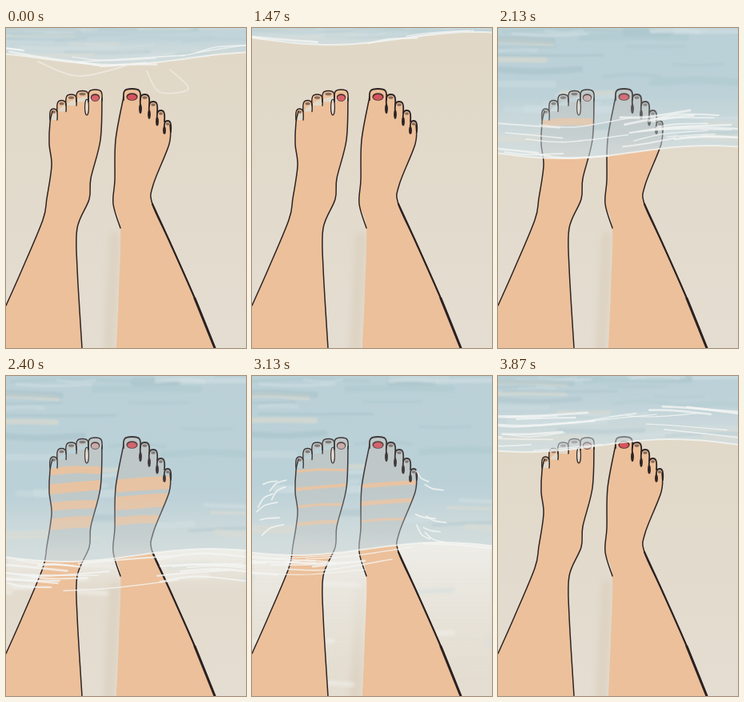
These frames come from a looping animation (300 px wide and 400 px high, 3940 ms). An HTML page with a canvas:

```html
<!DOCTYPE html>
<html lang="en">
<head>
<meta charset="utf-8">
<title>Feet in the surf</title>
<style>
html, body { margin: 0; width: 100%; height: 100%; overflow: hidden; background: #e3dbcd; }
canvas { display: block; width: 300px; height: 400px; }
</style>
</head>
<body>
<canvas id="stage" width="300" height="400"></canvas>
<script>
const ctx = document.getElementById('stage').getContext('2d');
const W = 300, H = 400, LOOP = 3940, LAST = 58;
const SKIN = '#ecc09a', INK = '#2b2223', FOAM = '#f4f6f4';

// Step and mean height of the shoreline
const tide = [[0, 38], [7, -20], [20, -20], [22, 13], [32, 155], [36, 224], [41, 250], [47, 216], [58, 87]];

const lerp = (a, b, k) => a + (b - a) * k;
const clamp = (v, lo = 0, hi = 1) => Math.min(hi, Math.max(lo, v));
const ramp = (v, a, b) => clamp((v - a) / (b - a));

function random(seed) {
  return (lo = 0, hi = 1) => lerp(lo, hi, (seed = seed * 16807 % 2147483647) / 2147483647);
}

function sea(step) {
  const i = Math.max(1, tide.findIndex(key => key[0] >= step));
  const [a, from] = tide[i - 1], [b, to] = tide[i];
  const level = lerp(from, to, ramp(step, a, b));
  const ebb = ramp(step, 36, 47);
  const soak = ramp(step, 32, 36) * (1 - ramp(step, 47, 56));
  return {
    step, level, soak,
    depth: 45 + 125 * ebb,
    band: 15 - 10 * ebb,
    above: clamp((level - 20) * 0.65, 0, 45) * (1 - soak),
    below: (38 - 14 * ebb) * soak,
    at: x => level + 8 * Math.sin((x - 45) / 58 + step * 0.03)
  };
}

// Smooth path passing through a flat list of points
function curve(p, path = new Path2D()) {
  const pt = i => { i = 2 * clamp(i, 0, p.length / 2 - 1); return [p[i], p[i + 1]]; };
  path.lineTo(...pt(0));
  for (let i = 1; i < p.length / 2; i++) {
    const [a, b, c, d] = [pt(i - 2), pt(i - 1), pt(i), pt(i + 1)];
    path.bezierCurveTo(b[0] + (c[0] - a[0]) / 6, b[1] + (c[1] - a[1]) / 6,
      c[0] - (d[0] - b[0]) / 6, c[1] - (d[1] - b[1]) / 6, ...c);
  }
  return path;
}

const flip = p => p.map((_, i) => p[p.length - 2 - i + 2 * (i % 2)]);

const leftOuter = [58, 104, 55, 118, 54, 145, 57, 172, 51, 213, 46, 240, 20, 302, 0, 347];
const leftInner = [120, 88, 118, 140, 106, 188, 104, 214, 89, 250, 89, 300, 95, 400];
const rightInner = [147, 86, 137, 140, 136, 190, 134, 220, 143, 250];
const rightOuter = [205, 121, 204, 145, 184, 196, 183, 220, 205, 268, 236, 338, 261, 400];

// Toes run outwards from the big one
const left = [], right = [];
for (let i = 0, xl = 120, xr = 147; i < 5; i++) {
  const wl = 17 - 2 * i, wr = i ? 12 - i : 21;
  left.push({ x: xl - wl, w: wl, top: 77 + 1.5 * i * i, gap: xl - wl });
  right.push({ x: xr, w: wr, top: 76 + 6 * i + i * i, gap: xr + wr });
  xl -= wl;
  xr += wr;
}
const toes = [...left, ...right];

function toePath({ x, w, top }) {
  const p = new Path2D(), base = top + 14;
  p.moveTo(x, base);
  p.bezierCurveTo(x - 1, top + 2, x + 1, top, x + w / 2, top);
  p.bezierCurveTo(x + w - 1, top, x + w + 1, top + 2, x + w, base);
  return p;
}

function legPath(outline, row) {
  const p = curve(outline);
  row.forEach(t => p.lineTo(t.x + t.w / 2, t.top + 8));
  return p;
}

const leftLeg = legPath([...flip(leftInner)], left);
curve(leftOuter, leftLeg).lineTo(0, 400);
const rightLeg = legPath([138, 400, 141, 330, ...flip(rightInner)], right);
curve(rightOuter, rightLeg);
const skin = new Path2D();
[leftLeg, rightLeg, ...toes.map(toePath)].forEach(p => skin.addPath(p));

function line(path, color, width) {
  ctx.strokeStyle = color;
  ctx.lineWidth = width;
  ctx.stroke(path);
}

function oval(x, y, rx, ry, color) {
  ctx.fillStyle = color;
  ctx.beginPath();
  ctx.ellipse(x, y, rx, ry, 0, 0, 7);
  ctx.fill();
}

function wash(y1, y2, from, to) {
  const g = ctx.createLinearGradient(0, y1, 0, y2);
  g.addColorStop(0, from);
  g.addColorStop(1, to);
  ctx.fillStyle = g;
  ctx.fillRect(0, 0, W, H);
}

// Draw with a temporary clip, opacity or blur
function scoped(draw, { clip, alpha = 1, blur = 0 }) {
  ctx.save();
  if (clip) ctx.clip(clip);
  ctx.globalAlpha *= alpha;
  if (blur) ctx.filter = `blur(${blur}px)`;
  draw();
  ctx.restore();
}

function sand() {
  wash(0, H, '#e0d7c6', '#e4ddd1');
  scoped(() => line(curve([136, 262, 129, 400]), '#ddd3c3', 14), { blur: 3 });
}

function soaked(s) {
  scoped(() => {
    wash(s.level, s.level + s.depth, '#f0f1ee', 'rgba(238,236,230,0)');
    const rnd = random(77);
    for (let i = 0; i < 14; i++) {
      const x = rnd(-40, W), y = s.level + rnd(0.1, 1) * s.depth;
      line(curve([x, y, x + rnd(30, 90), y + rnd(-4, 4)]), i % 3 ? '#f1efea' : '#d5dfdf', 5);
    }
  }, { alpha: s.soak * 0.8, blur: 2, clip: below(s) });
}

function brushwork({ level, step }) {
  const rnd = random(4211);
  const tones = ['#d6e2e5', '#a3bec5', '#cbdde1', '#e6dccb', '#aac6cd'];
  for (let i = 0; i < 34; i++) {
    const y = rnd(0, 0.92) * Math.max(level, 8), len = rnd(40, 150);
    const x = rnd(-70, 280) + 14 * Math.sin(step / 9 + i);
    const p = curve([x, y, x + len / 2, y + rnd(-4, 4), x + len, y]);
    line(p, tones[i % 5], rnd(2, 2 + clamp(level / 15, 1, 9)));
  }
}

function tintLegs({ level, band }) {
  wash(level - 22, level + 10, 'rgba(186,198,200,.93)', 'rgba(203,213,214,.75)');
  const rnd = random(913);
  const stripe = (x, y, w) => {
    const size = band * rnd(0.6, 1.15);
    if (y < level - 22) line(curve([x, y + 2, x + w / 2, y - 1, x + w, y - rnd(0, 4)]), SKIN, size);
  };
  for (let y = 118; y < 200; y += 22) {
    stripe(52, y, 64);
    stripe(134, y + 18, 70);
  }
}

function nail({ x, w, top }, color) {
  oval(x + w / 2, top + 10, w * 0.34, 4.8, '#4d3032');
  oval(x + w / 2, top + 10.5, w * 0.27, 3.5, color);
}

function outlines(level) {
  [leftOuter, leftInner, rightInner, rightOuter].forEach(p => line(curve(p), INK, 1.5));
  line(curve(rightOuter.slice(-8)), INK, 2.2);
  line(curve(rightOuter.slice(-4)), INK, 3);
  toes.forEach((t, i) => {
    const big = i % 5 === 0;
    line(toePath(t), INK, i > 4 ? 1.8 : 1.4);
    if (!big) oval(t.x + t.w / 2, t.top + 4, t.w * 0.28, 1.8, 'rgba(80,62,58,.65)');
  });
  right.slice(0, 4).forEach(t => oval(t.gap, t.top + 25, 1.9, 10 - t.top / 20, INK));
  const slit = new Path2D();
  slit.ellipse(101, 99, 2.4, 10, 0, 0, 7);
  ctx.fillStyle = '#e9ded0';
  ctx.fill(slit);
  line(slit, INK, 1.2);
  nail(left[0], level > 80 ? '#c9a6a2' : '#d8626a');
  nail(right[0], '#d5535d');
}

function ripples(step) {
  const rnd = random(58);
  scoped(() => {
    for (let i = 0; i < 14; i++) {
      const side = i % 2, x = side ? rnd(202, 220) : rnd(6, 26), y = rnd(118, 200);
      const dx = rnd(14, 28), dy = (side ? 1 : -1) * rnd(2, 18);
      line(curve([x, y, x + dx * 0.4, y + dy * 0.7, x + dx, y + dy]), FOAM, 1.8);
    }
  }, { alpha: 0.8 * clamp(1 - Math.abs(step - 47) / 5), blur: 0.4 });
}

function foam(s) {
  const rnd = random(3301 + Math.floor(s.step / 3));
  const count = 5 + (s.above + s.below) / 3;
  scoped(() => {
    for (let i = 0; i < count; i++) {
      const x = rnd(-60, 240), len = rnd(50, 150), shift = rnd(-s.above, s.below);
      const y = d => s.at(x + len * d) + shift + rnd(-3, 3);
      line(curve([x, y(0), x + len * 0.4, y(0.4), x + len, y(1)]), FOAM, rnd(1.2, 3));
    }
  }, { alpha: 0.75, blur: 0.4 });
}

function wisps(step) {
  scoped(() => {
    line(curve([176, 54, 192, 80, 228, 76, 205, 52]), '#f3efe7', 1.8);
    line(curve([40, 42, 92, 60, 160, 44]), '#f3efe7', 2);
  }, { alpha: clamp(0.65 - step * 0.16) });
}

function shore(s, side) {
  const p = [];
  for (let x = -50; x <= 350; x += 20) p.push(x, s.at(x));
  const path = curve(p);
  path.lineTo(350, side);
  path.lineTo(-50, side);
  path.closePath();
  return path;
}
const below = s => shore(s, H + 50);

function draw(step) {
  const s = sea(step), { level } = s;
  const wet = level > -10;
  const water = shore(s, -50);
  const reach = clamp(level * 0.6, 4, 70);

  ctx.lineCap = ctx.lineJoin = 'round';
  sand();
  if (s.soak) soaked(s);
  if (wet) scoped(() => {
    wash(level - reach, level + 10, '#b9d0d7', 'rgba(210,222,224,.7)');
    scoped(() => brushwork(s), { alpha: 0.55, blur: 1.2 });
  }, { clip: water });

  ctx.fillStyle = SKIN;
  ctx.fill(skin);
  if (wet) scoped(() => scoped(() => tintLegs(s), { clip: skin }), { clip: water });
  scoped(() => outlines(level), { blur: 0.45 });

  if (wet) {
    scoped(() => wash(level - 85, level, 'rgba(200,215,219,.12)', 'rgba(210,221,223,.55)'), { clip: water });
    ripples(step);
    line(water, 'rgba(246,247,244,.75)', 2);
    foam(s);
  }
  wisps(step);
}

// Steps last 70, 60 and 70 ms in turn
function stepAt(t) {
  const m = t % 200;
  return Math.min(LAST, Math.floor(t / 200) * 3 + (m < 70 ? 0 : m < 130 ? 1 : 2));
}

const start = performance.now();
let shown = -1;
function tick() {
  const step = stepAt((performance.now() - start) % LOOP);
  if (step !== shown) draw(shown = step);
  requestAnimationFrame(tick);
}
tick();
</script>
</body>
</html>
```
